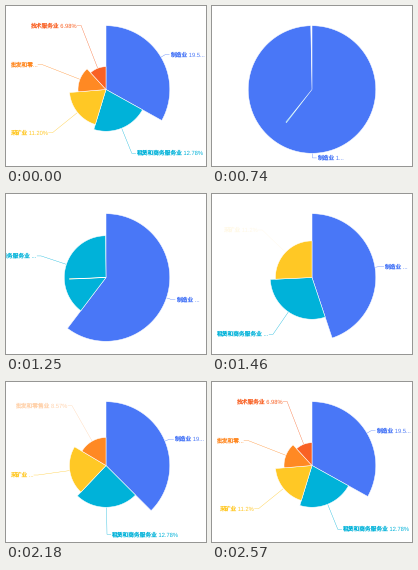
Animation of 200 by 160 pixels, one loop 3.07 s. Source, as a matplotlib script:

```python
import numpy as np
import matplotlib.pyplot as plt
from matplotlib.animation import FuncAnimation

plt.rcParams["font.family"] = ["Liberation Sans", "Noto Sans CJK JP"]
plt.rcParams["font.weight"] = "light"
plt.rcParams["text.hinting"] = "none"

W, H, DPI = 200, 160, 100
PX = 72 / DPI
CX, CY, R = 100, 83.5, 63.8
LEAD = 5            # gap between the full radius and the label elbow
STEP, LOOP = 10, 3070
MOVE, FADE = 240, 500

VALUES = np.array([19.53, 12.78, 11.20, 8.57, 6.98])
COLORS = ["#4977f7", "#00b2d9", "#ffc825", "#ff8923", "#f96124"]

# start time of each stage and the labels of its slices
LAST = ["制造业 19.5...", "租赁和商务服务业 12.78%", "采矿业 11.2%",
        "批发和零...", "技术服务业 6.98%"]
FIRST = [s.replace("11.2%", "11.20%") for s in LAST]
STAGES = [
    (-9999, FIRST),
    (0, ["制造业 1..."]),
    (710, ["制造业 ...", "租赁和商务服务业 ..."]),
    (1220, ["制造业 ...", "租赁和商务服务业 ...", "采矿业 11.2%"]),
    (1820, ["制造业 19...", "租赁和商务服务业 12.78%", "采矿业 ...",
            "批发和零售业 8.57%"]),
    (2270, LAST),
]


def clamp(x):
    return min(max(x, 0.0), 1.0)


def ease(p):
    return 4 * p ** 3 if p < 0.5 else 1 - 4 * (1 - p) ** 3


def lerp(a, b, p):
    return a + (b - a) * p


def polar(r, deg):
    a = np.radians(deg)
    return np.array([CX + r * np.sin(a), CY - r * np.cos(a)])


def layout(n):
    """Angles, radii and label lines of a rose with n slices."""
    ends = np.cumsum(VALUES[:n]) / VALUES[:n].sum() * 360
    starts = np.concatenate([[0], ends[:-1]])
    radii = R * VALUES[:n] / VALUES[0]
    slices = []
    for a, b, r in zip(starts, ends, radii):
        mid = (a + b) / 2
        elbow = polar(R + LEAD, mid)
        side = 1 if elbow[0] > CX - 1e-6 else -1
        slices.append(dict(angles=np.array([a, b]), r=r, side=side,
                           line=np.array([polar(r, mid), elbow])))
    return slices


LAYOUTS = {n: layout(n) for n in range(1, 6)}


def wedge(a, b, r):
    arc = polar(r, np.linspace(a, b, 121)).T
    if b - a > 359.99:
        return arc
    return np.vstack([[CX, CY], arc])


def shown_time(t):
    """Picture time: steps of 30 ms with a rest on the full disc."""
    if t < 240:
        return t // 30 * 30
    if t < 740:
        return 240
    return min(740 + (t - 740) // 30 * 30, 2570)


fig = plt.figure(figsize=(W / DPI, H / DPI), dpi=DPI, facecolor="white")
ax = fig.add_axes([0, 0, 1, 1])
ax.set_xlim(0, W)
ax.set_ylim(H, 0)
ax.axis("off")

sectors, lines, labels = [], [], []
for i, color in enumerate(COLORS):
    sectors += ax.fill([0, 0, 1], [0, 1, 0], fc=color, ec="white",
                       lw=0.5 * PX, joinstyle="bevel", zorder=2 + i,
                       snap=False)
    lines += ax.plot([], [], color=color, lw=0.35 * PX, zorder=1, snap=False)
    labels.append(ax.text(0, 0, "", color=color, fontsize=5.75 * PX,
                          va="center", zorder=10))


def place(i, angles, r, line, side, text, alpha, text_alpha):
    sectors[i].set_xy(wedge(*angles, r))
    end = line[1] + [4 * side, 0]
    lines[i].set_data(*np.vstack([line, end]).T)
    labels[i].set_position(line[1] + [4.5 * side, 0])
    labels[i].set_ha("left" if side > 0 else "right")
    labels[i].set_text(text)
    sectors[i].set_alpha(alpha)
    for part in (lines[i], labels[i]):
        part.set_alpha(text_alpha)


def draw(frame):
    t = shown_time(frame * STEP)
    k = max(j for j in range(1, len(STAGES)) if STAGES[j][0] <= t)
    start, texts = STAGES[k]
    old_texts = STAGES[k - 1][1]
    old, new = LAYOUTS[len(old_texts)], LAYOUTS[len(texts)]
    age = t - start
    p = ease(clamp(age / MOVE))
    switched = p > 0.1

    for i in range(len(COLORS)):
        known, kept = i < len(old), i < len(new)
        for part in (sectors[i], lines[i], labels[i]):
            part.set_visible(known or kept)
        if known and kept:
            a, b = old[i], new[i]
            place(i, lerp(a["angles"], b["angles"], p), lerp(a["r"], b["r"], p),
                  lerp(a["line"], b["line"], p), (b if switched else a)["side"],
                  (texts if switched else old_texts)[i], 1, 1)
        elif kept:
            b = new[i]
            a0, a1 = b["angles"]
            fade = 300 if k == len(STAGES) - 1 else FADE
            place(i, (a0, lerp(a0, a1, p)), b["r"], b["line"], b["side"],
                  texts[i], 1, clamp(age / fade) ** 3)
        elif known:
            a = old[i]
            alpha = (1 - clamp(age / 100)) ** 3
            place(i, a["angles"], a["r"], a["line"], a["side"],
                  old_texts[i], alpha, alpha)
    return sectors + lines + labels


anim = FuncAnimation(fig, draw, frames=LOOP // STEP, interval=STEP,
                     init_func=lambda: draw(0), repeat=True, repeat_delay=0)
plt.show()
```
